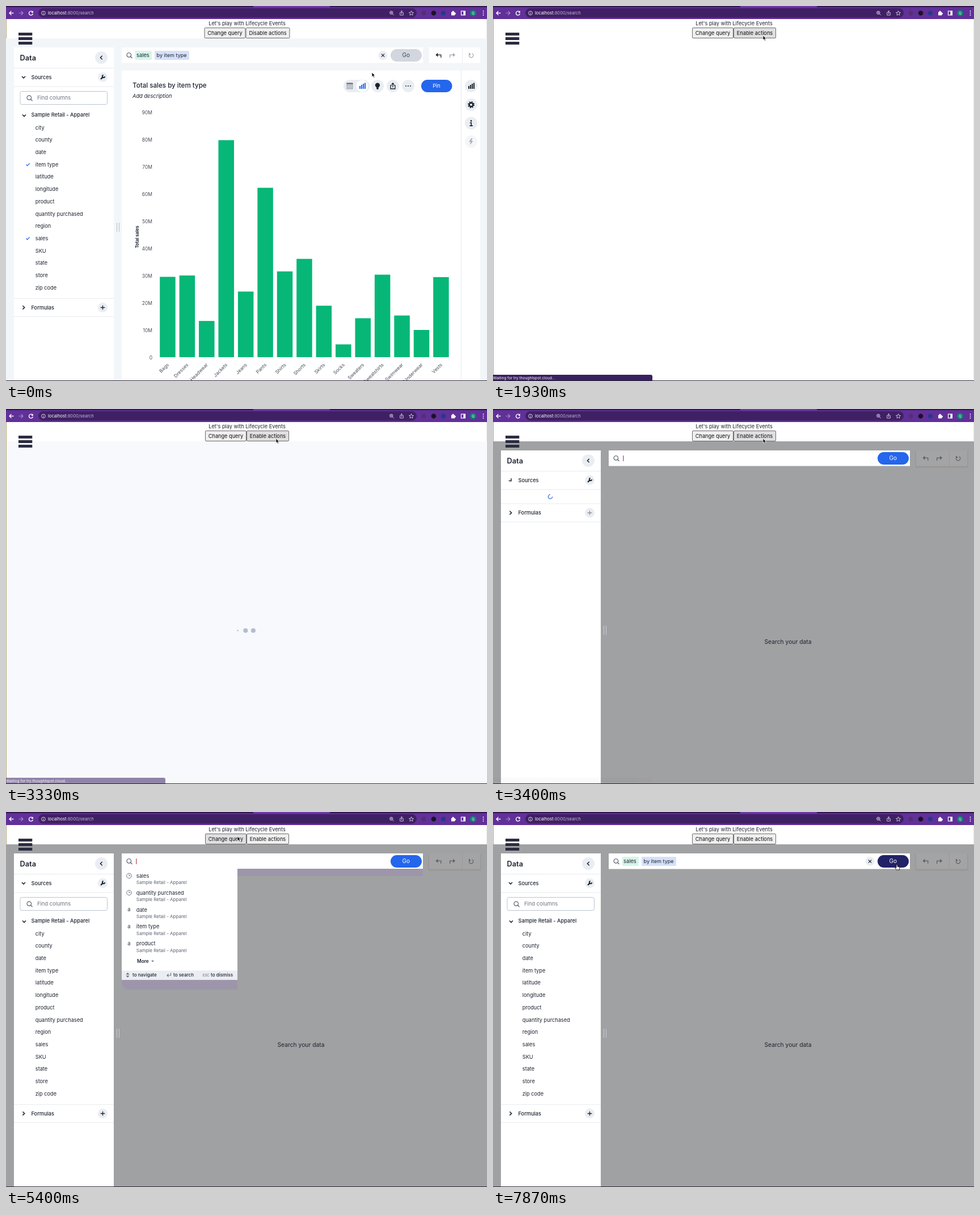
An HTML page for the animation above (8 s loop, 848 px wide and 661 px high).

```html
<!DOCTYPE html>
<html lang="en">
<head>
<meta charset="utf-8">
<title>Lifecycle events demo</title>
<style>
html, body { margin: 0; width: 100%; height: 100%; overflow: hidden; background: #fff; }
svg { display: block; width: 100vw; height: 100vh; font-family: Inter, "Liberation Sans", sans-serif; }
</style>
</head>
<body>
<svg id="stage" viewBox="0 0 848 661" preserveAspectRatio="none"></svg>
<script>
const LOOP = 8000;
const INK = '#1d232f', SOFT = '#eaedf2', BLUE = '#2466ec', LINE = '#e8ebf0';
const COLUMNS = ['city', 'county', 'date', 'item type', 'latitude', 'longitude', 'product',
  'quantity purchased', 'region', 'sales', 'SKU', 'state', 'store', 'zip code'];
const SALES = { Bags: 29.5, Dresses: 30, Headwear: 13.3, Jackets: 79.7, Jeans: 24.1, Pants: 62.2,
  Shirts: 31.5, Shorts: 36.1, Skirts: 18.9, Socks: 4.7, Sweaters: 14.3, Sweatshirts: 30.3,
  Swimwear: 15.3, Underwear: 10, Vests: 29.4 };

// Markup helpers; text is centred on y.
const text = (x, y, s, size = 9.2, more = '') =>
  `<text x="${x}" y="${(y + size * .36).toFixed(2)}" font-size="${size}" fill="${INK}" ${more}>${s}</text>`;
const rect = (x, y, w, h, fill, more = '') =>
  `<rect x="${x}" y="${y}" width="${w}" height="${h}" fill="${fill}" ${more}/>`;
const circle = (x, y, r, fill, more = '') => `<circle cx="${x}" cy="${y}" r="${r}" fill="${fill}" ${more}/>`;
const path = (d, color = INK, w = 1.4, more = '') =>
  `<path d="${d}" fill="none" stroke="${color}" stroke-width="${w}" ${more}/>`;
const solid = (d, color = INK, more = '') => `<path d="${d}" fill="${color}" ${more}/>`;
const at = (x, y, body) => `<g transform="translate(${x} ${y})">${body}</g>`;
const group = (id, body) => `<g id="${id}">${body}</g>`;
const MID = 'text-anchor="middle"', MED = 'font-weight="500"', SEMI = 'font-weight="600"';

const lens = (x, y, c = '#5a6270') => at(x, y, circle(-.7, -.7, 3.8, 'none', `stroke="${c}" stroke-width="1.2"`) + path('M2 2L5 5', c, 1.3));
const plus = path('M-3.8 0H3.8M0 -3.8V3.8', INK, 1.3);
const cross = path('M-2.7 -2.7L2.7 2.7M2.7 -2.7L-2.7 2.7', INK, 1.2);
const chevron = path('M-3 -1.6L0 1.6L3 -1.6', INK, 1.5);
const wrench = path('M-3.4 3.4L1 -1', INK, 2.2) + path('M3.8 -1.5A2.3 2.3 0 1 1 1.2 -3.7', INK, 1.7);
const bars = c => rect(-5, 0, 2, 5, c) + rect(-2, -2, 2, 7, c) + rect(1, -4, 2, 9, c) + rect(4, -5.5, 2, 10.5, c);
const undo = c => path('M4.3 4V-.8H-2.5', c, 1.3) + solid('M-1.2 -4.4V2.8L-5 -.8Z', c);
const redo = c => `<g transform="scale(-1 1)">${undo(c)}</g>`;
const reset = c => path('M-2.4 -2.6A3.7 3.7 0 1 0 1.6 -3.2', c, 1.2) + solid('M-4 -5V-.8H.2Z', c);

function browserBar() {
  const c = '#d9cdea';
  return rect(0, 0, 848, 23, '#613099') + rect(0, 0, 848, 2, '#321450') + rect(436, 0, 135, 2, '#6d3aa8')
    + rect(57, 4, 667, 16.5, '#402064', 'rx="8.2"')
    + at(9.5, 12.5, path('M4 0H-3.5M0 -3.5L-3.5 0L0 3.5', '#fff', 1.3))
    + at(26.5, 12.5, path('M-4 0H3.5M0 -3.5L3.5 0L0 3.5', '#a689c8', 1.2))
    + at(44, 12.5, path('M2.6 -2.2A3.5 3.5 0 1 0 3.4 1', '#fff', 1.4) + solid('M3.9 -4.2V-.4H.2Z', '#fff'))
    + at(66, 12.5, circle(0, 0, 3.4, 'none', `stroke="${c}"`) + path('M0 -.5V2M0 -2V-1.2', c, 1))
    + `<text x="74" y="15.2" font-size="7.6" fill="#c5b4da"><tspan fill="#fff">localhost</tspan>:8000/search</text>`
    + at(680, 12.5, circle(-.7, -.7, 2.7, 'none', `stroke="${c}"`) + path('M1.4 1.4L3.8 3.8M-2.2 -.7H.8M-.7 -2.2V.8', c, .9))
    + at(697.5, 12.5, path('M-1 -1H-2.8V3.6H2.8V-1H1M0 1.5V-4M-1.8 -2.4L0 -4.2L1.8 -2.4', c, .9))
    + at(714.5, 12.5, path('M0 -4L1.2 -1.2L4 -1L1.8 .9L2.5 3.7L0 2.2L-2.5 3.7L-1.8 .9L-4 -1L-1.2 -1.2Z', c, .9))
    + circle(736.5, 12.5, 4, '#543071') + circle(754, 12.5, 4.3, '#1c1326') + circle(771, 12.5, 4, '#243a8c')
    + at(788.5, 12.5, rect(-3.5, -2, 6.3, 6, '#fff') + circle(-.3, -2.4, 1.5, '#fff') + circle(3, .8, 1.5, '#fff'))
    + at(806, 12.5, rect(-3.5, -3.5, 7, 7, 'none', 'stroke="#fff" stroke-width="1.2"') + rect(.4, -3.5, 3.4, 7, '#fff'))
    + circle(823.5, 12.5, 5.6, '#128174') + text(823.5, 12.5, 'Q', 6, `${MID} style="fill:#fff"`)
    + [9, 12.5, 16].map(y => circle(841.5, y, .9, '#fff')).join('');
}

const sidebar = rect(14, 73, 176, 587, '#fff') + text(24.5, 91, 'Data', 12.8, SEMI)
  + circle(168, 91, 11, SOFT) + path('M169.7 87.8L166.4 91L169.7 94.2', INK, 1.5)
  + rect(14, 109, 176, 1, LINE) + rect(14, 141.5, 176, 1, LINE)
  + `<g id="arrow">${chevron}</g>` + text(44.5, 125.5, 'Sources', 9.2, MED)
  + circle(170.5, 125.5, 8.5, SOFT) + at(170.5, 125.5, wrench)
  + group('columns',
    rect(25, 150.5, 153.5, 23, '#fff', 'rx="3" stroke="#bcc3cf"') + lens(41.5, 162.3)
    + text(55, 162, 'Find columns', 9.4, 'style="fill:#6d7482"')
    + at(32, 193, chevron) + text(44.5, 192, 'Sample Retail - Apparel', 9.2, MED)
    + COLUMNS.map((s, i) => text(51.8, 214.3 + 21.7 * i, s)).join('')
    + group('checks', [3, 9].map(i => at(38.5, 214.3 + 21.7 * i, path('M-3 0L-1 2.2L3.2 -2.2', BLUE, 1.3))).join('')))
  + group('spinner', path('M3.6 0A3.6 3.6 0 1 1 0 -3.6', '#3d74ea', 1.4))
  + group('formulas', rect(14, 515, 176, 1, LINE) + rect(14, 547, 176, 1, LINE)
    + path('M29.4 528.2L32.7 531.4L29.4 534.6', INK, 1.5) + text(44.5, 531.3, 'Formulas', 9.2, MED)
    + circle(170.5, 531.5, 8.5, SOFT) + `<g id="plus" transform="translate(170.5 531.5)">${plus}</g>`);

function chart() {
  let s = rect(204, 114, 632, 546, '#fff') + rect(802, 114, 1, 546, LINE)
    + text(223, 140.3, 'Total sales by item type', 11.6, MED)
    + text(223, 158.5, 'Add description', 9.3, 'font-style="italic"')
    + rect(595, 130, 46, 22, SOFT, 'rx="11"') + circle(628, 141, 10.5, '#fff') + at(628, 141, bars(BLUE))
    + at(606, 141, rect(-5.5, -5.5, 11, 11, '#9aa1ac') + path('M-5.5 -2.2H5.5M-5.5 .5H5.5M-5.5 3H5.5M-2.7 -3V5.5M0 -3V5.5M2.7 -3V5.5', SOFT, .7) + rect(-5.5, -5.5, 11, 2.5, '#737b88'))
    + [655, 682, 709].map(x => circle(x, 141, 11, SOFT)).join('')
    + at(655, 141, circle(0, -1.4, 4.2, INK) + rect(-1.7, 1, 3.4, 5, INK, 'rx="1"'))
    + at(682, 141, path('M-1.8 -1.2H-4V5H4V-1.2H1.8M0 2.5V-4.6M-2.2 -2.8L0 -5L2.2 -2.8', INK, 1.3))
    + [705, 709, 713].map(x => circle(x, 141, 1, INK)).join('')
    + rect(732, 130, 54.5, 22, BLUE, 'rx="11"') + text(759, 141, 'Pin', 9.3, `${MID} style="fill:#fff"`)
    + [141, 174, 206.5].map(y => circle(820, y, 11, SOFT)).join('') + circle(820, 239, 11, '#f5f6f8')
    + at(820, 141, bars(INK))
    + circle(820, 174, 3.3, 'none', `stroke="${INK}" stroke-width="2.4"`)
    + circle(820, 174, 5, 'none', `stroke="${INK}" stroke-width="2" stroke-dasharray="2 1.93"`)
    + at(820, 206.5, circle(0, -4, 1.4, INK) + path('M-2.2 -.8H.3V4.4M-2.6 4.6H2.8', INK, 1.6))
    + solid('M820.5 233L816 239.5H819L818 245L823.5 237.8H820.3L822.5 233Z', '#a9aeb8')
    + `<text transform="translate(234 407) rotate(-90)" ${MID} font-size="7.6" font-weight="700" fill="${INK}">Total sales</text>`;
  for (let i = 0; i < 10; i++)
    s += text(258, 619.7 - 48 * i, i ? i * 10 + 'M' : '0', 8.5, 'text-anchor="end" style="fill:#484f5b"');
  Object.entries(SALES).forEach(([name, v], i) => {
    const x = 271.2 + 34.43 * i, h = v * 4.8;
    s += rect(x, 619 - h, 27.5, h, '#06b777')
      + `<text transform="translate(${x + 16.5} 633) rotate(-45)" text-anchor="end" font-size="8.4" fill="#484f5b">${name}</text>`;
  });
  return s;
}

const searchBar = rect(204, 73, 531, 27.5, '#fff') + lens(217.5, 87)
  + group('tokens', rect(227.5, 79, 29.5, 16, '#d6f5ea', 'rx="2"') + text(230, 87, 'sales', 9.3)
    + rect(262, 79, 61, 16, '#d5e1f8', 'rx="2"') + text(265.5, 87, 'by item type', 9.1)
    + circle(664.5, 87, 8, SOFT) + at(664.5, 87, cross))
  + `<rect id="caret" x="229.2" y="82" width="1.2" height="10" fill="#b3404f"/>`
  + `<rect id="go" x="678" y="76" width="55" height="22" rx="11"/>`
  + `<text id="goText" x="705.3" y="90.4" font-size="10" ${MID}>Go</text>`;

const tools = (bg, sep, a, b) => rect(746, 73, 90, 27.5, bg) + rect(804, 73, 1, 27.5, sep)
  + at(762.5, 87, undo(a)) + at(787, 87, redo(b)) + at(820, 87, reset(b));

const hint = (x, s) => text(x, 287.3, s, 8.1, MED);
const dropdown = rect(408, 100, 327, 12.5, '#9d96ab')
  + solid('M204 296H408V313H216Q206 311 204 302Z', '#9d96ab')
  + rect(204, 100, 204, 196, '#fff') + rect(204, 279.5, 204, 16.5, SOFT)
  + ['sales', 'quantity purchased', 'date', 'item type', 'product'].map((s, i) => {
    const y = 112.4 + 29.9 * i;
    return text(229.8, y, s) + text(229.8, y + 12, 'Sample Retail - Apparel', 8, 'style="fill:#5b6270"')
      + (i < 2 ? circle(217, y, 4.3, 'none', 'stroke="#6b7280"') + path(`M217 ${y - 2.6}V${y}H219.3`, '#6b7280', 1)
        : text(217, y - .8, 'a', 9.2, `${MID} ${SEMI} style="fill:#59606d"`));
  }).join('')
  + text(231, 263, 'More', 8.3, SEMI) + solid('M256 261.8H261L258.5 264.6Z', '#6b7280')
  + solid('M211.3 286.4L214.5 283L217.7 286.4ZM211.3 288.4L214.5 291.8L217.7 288.4Z', '#6b7280')
  + path('M290.5 283.5V288H284M286.5 285.5L284 288L286.5 290.5', '#6b7280', 1.1)
  + text(347, 288, 'ESC', 5.8, 'style="fill:#5b6270"')
  + hint(223, 'to navigate') + hint(295, 'to search') + hint(361, 'to dismiss');

const handle = c => path('M195.5 382V398M199.5 382V398', c, 1);
const button = id => `<rect id="${id}" y="38.5" height="18" rx="1.5" stroke="#6c6c6c"/><text id="${id}T" y="50.8" font-size="9.2" fill="#111" ${MID}></text>`;

document.getElementById('stage').innerHTML =
  rect(0, 0, 848, 661, '#fff') + rect(0, 23, 1, 637, '#b9a878') + rect(847, 23, 1, 637, '#e6e6ea')
  + group('report', rect(0, 57, 848, 604, '#f3f6f9') + tools('#fff', LINE, INK, '#a3a9b4') + chart() + handle('#b4bccb'))
  + group('loader', rect(1, 57, 847, 603, '#f8f9fc') + [0, 1, 2].map(i => circle(408.7 + 13.6 * i, 390.5, 4, '#b4bdce', `id="dot${i}"`)).join(''))
  + group('empty', rect(0, 57, 848, 604, '#a0a1a3') + rect(744.5, 73.5, 93, 30, '#989899', 'rx="2"')
    + tools('#a4a4a5', '#989899', '#5d6066', '#5d6066') + handle('#c9ccd8') + text(520, 410.3, 'Search your data', 10.3, MID))
  + group('app', sidebar + searchBar) + group('dropdown', dropdown)
  + text(425, 30.5, "Let's play with Lifecycle Events", 9.2, MID) + button('query') + button('toggle')
  + [47, 55, 63].map(y => rect(22, y, 24.3, 5, '#2b2b40')).join('')
  + group('status', rect(-3, 650, 284, 14, '#392060', 'rx="3"') + text(0, 655.3, 'Waiting for try.thoughtspot.cloud...', 6.7, 'style="fill:#fff"'))
  + browserBar() + rect(0, 660, 848, 1, '#2b2338')
  + group('pointer', solid('M0 0V8L1.9 6.3L3.2 9.2L4.7 8.5L3.4 5.7H5.8Z', '#111', 'stroke="#fff" stroke-width=".7"'))
  + group('hand', solid('M-1 0Q0 -1 1 0V3L4.3 3.9Q5.2 4.2 5 5.2L4.3 9H-.7L-3.3 5.6Q-3.2 4.3 -1 5.3Z', '#fff', 'stroke="#111" stroke-width=".9"'));

const el = {};
document.querySelectorAll('[id]').forEach(n => el[n.id] = n);
const show = (id, on) => el[id].setAttribute('display', on ? 'inline' : 'none');
const set = (id, attrs) => { for (const k in attrs) el[id].setAttribute(k, attrs[k]); };
const clamp = v => Math.max(0, Math.min(1, v));

const smooth = p => p * p * (3 - 2 * p), easeIn = p => p * p, easeOut = p => 1 - (1 - p) ** 2;
// time, x, y, easing towards this point
const MOVES = [[30, 645, 117], [400, 594, 60], [690, 594, 60], [1270, 476, 52], [4340, 476, 52],
  [5070, 408, 43], [6100, 408, 43], [6270, 426, 58, easeIn], [6530, 573, 75, easeOut],
  [6750, 573, 75], [7470, 712, 93]];

function pointerAt(t) {
  const i = MOVES.findIndex(m => m[0] > t);
  if (i === 0) return MOVES[0].slice(1, 3);
  if (i < 0) return MOVES[MOVES.length - 1].slice(1, 3);
  const a = MOVES[i - 1], b = MOVES[i], p = (b[3] || smooth)((t - a[0]) / (b[0] - a[0]));
  return [a[1] + (b[1] - a[1]) * p, a[2] + (b[2] - a[2]) * p];
}

function drawButton(id, label, x0, x1, [mx, my], pressed) {
  const over = mx > x0 && mx < x1 && my > 38 && my < 57;
  set(id, { x: x0 + .5, width: x1 - x0 - 1, fill: pressed ? '#f5f5f5' : over ? '#dfdfe1' : '#efefef' });
  set(id + 'T', { x: (x0 + x1) / 2 });
  el[id + 'T'].textContent = label;
}

function render(t) {
  const before = t < 1870, ready = t >= 3400, listed = before || t >= 3535, queried = before || t >= 5670;
  show('report', before);
  show('loader', t >= 2060 && !ready);
  show('empty', ready);
  show('app', before || ready);
  show('columns', listed);
  show('checks', before);
  show('spinner', !listed);
  show('dropdown', t >= 3600 && t < 5600);
  show('tokens', queried);
  show('caret', !queried && (t < 3870 || t >= 4400 && t < 4930 || t >= 5400));

  const turn = before ? 0 : -45 * clamp(1 - (t - 3400) / 120);
  set('arrow', { transform: `translate(31 125.5) rotate(${turn})` });
  set('spinner', { transform: `translate(101 154.5) rotate(${(t - 3400) * .4})` });
  set('formulas', { transform: `translate(0 ${listed ? 0 : -348.5})` });
  set('plus', { opacity: listed ? 1 : .45 });
  for (let i = 0; i < 3; i++) {
    const wave = .5 - .5 * Math.cos((t - 3330) / 1000 * 2 * Math.PI - i * 2 * Math.PI / 3);
    set('dot' + i, { r: Math.min(4.1, 1.3 + 3.7 * wave) });
  }
  set('status', { opacity: t < 3270 ? clamp((t - 1860) / 70) : clamp(1 - (t - 3270) / 133) });

  const [x, y] = pointerAt(t), lag = pointerAt(t - 60);
  const off = t < 1800;
  drawButton('query', 'Change query', off ? 349.5 : 351, off ? 422.5 : 424, lag, t >= 5470 && t < 5600);
  drawButton('toggle', off ? 'Disable actions' : 'Enable actions', off ? 422.5 : 424, off ? 500.5 : 499, lag, t >= 1730 && t < 1800);

  const overGo = x > 680 && y > 76 && t > 6800;
  set('go', { fill: before ? '#d2d6de' : t >= 7870 ? '#222268' : overGo ? '#1b4fc2' : BLUE });
  set('goText', { fill: before ? '#3d4552' : '#fff' });
  show('pointer', !overGo);
  show('hand', overGo);
  set(overGo ? 'hand' : 'pointer', { transform: `translate(${x} ${y})` });
}

const start = performance.now();
(function tick() {
  render((performance.now() - start) % LOOP);
  requestAnimationFrame(tick);
})();
</script>
</body>
</html>
```
